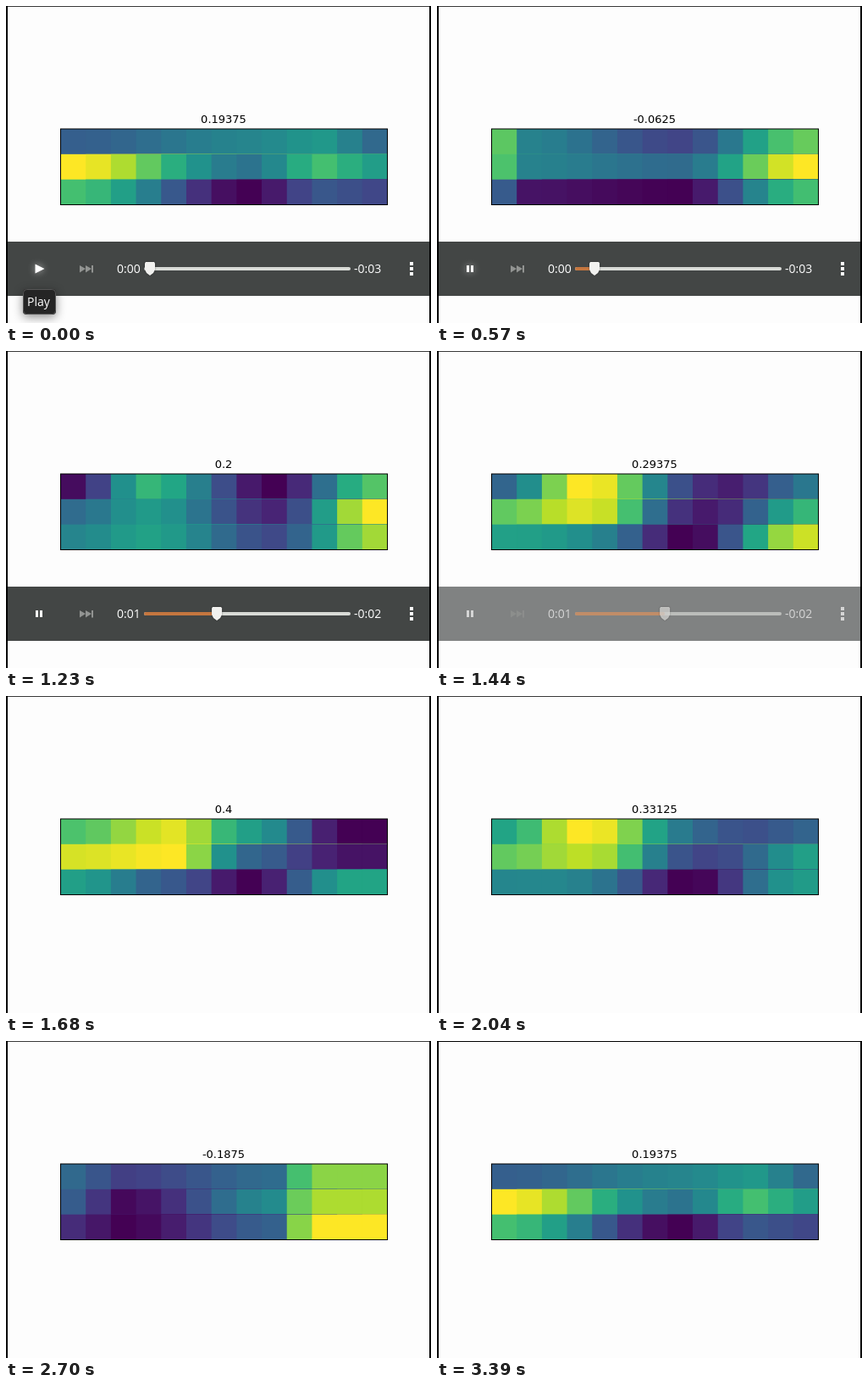
An HTML page with a canvas for the animation above (3480 ms loop, 502x374 px).

```html
<!DOCTYPE html>
<html lang="en">
<head>
<meta charset="utf-8">
<title>Heatmap video</title>
<style>
html, body { margin: 0; width: 100%; height: 100%; overflow: hidden; background: #fdfdfd; }
canvas { display: block; }
</style>
</head>
<body>
<canvas id="stage" width="502" height="374"></canvas>
<script>
const ctx = document.getElementById('stage').getContext('2d');
const LOOP = 3480, STEP = 30;
const COLS = 13, ROWS = 3;
const MAP = { x: 64.5, y: 145, w: 386, h: 89.5 };
const UI_FONT = '14px "Open Sans", "Noto Sans", sans-serif';
const VIRIDIS = ['#440154', '#482475', '#414487', '#355f8d', '#2a788e', '#21918c',
  '#22a884', '#44bf70', '#7ad151', '#bddf26', '#fde725']
  .map(hex => [1, 3, 5].map(i => parseInt(hex.slice(i, i + 2), 16)));

// Each row of a pose eases through four heats (percent), placed at the columns `at`.
const poses = [
  { time: 240, title: 0.19375, at: [0, 7, 10, 12], rows: [[30, 45, 53, 34], [100, 38, 70, 55], [70, 0, 27, 21]] },
  { time: 570, title: -0.0625, at: [0, 1, 7, 12], rows: [[73, 43, 20, 75], [70, 43, 34, 98], [28, 5, 0, 68]] },
  { time: 1230, title: 0.2, at: [0, 3, 8, 12], rows: [[3, 66, 0, 73], [35, 54, 10, 100], [45, 57, 22, 86]] },
  { time: 1680, title: 0.4, at: [0, 4, 7, 11], rows: [[70, 94, 55, 0], [92, 98, 32, 5], [55, 27, 0, 57]] },
  { time: 2370, title: 0.26875, at: [0, 3, 8, 12], rows: [[45, 100, 20, 62], [55, 76, 16, 100], [36, 54, 0, 50]] },
  { time: 2700, title: -0.1875, at: [0, 2, 8, 9.5], rows: [[33, 18, 34, 80], [28, 2, 46, 85], [12, 0, 30, 97]] }
];
poses.push({ ...poses[0], time: 2940 });
const times = poses.map(p => p.time);

const mix = (a, b, k) => a + (b - a) * k;
const clamp = (v, lo = 0, hi = 1) => Math.min(hi, Math.max(lo, v));
const linear = k => k;
const smooth = k => k * k * (3 - 2 * k);

function sample(xs, ys, x, ease = linear) {
  let i = 0;
  while (i < xs.length - 2 && x >= xs[i + 1]) i++;
  return mix(ys[i], ys[i + 1], ease(clamp((x - xs[i]) / (xs[i + 1] - xs[i]))));
}

function viridis(v) {
  const p = clamp(v) * 10, i = Math.min(9, Math.floor(p));
  return `rgb(${VIRIDIS[i].map((c, n) => Math.round(mix(c, VIRIDIS[i + 1][n], p - i)))})`;
}

function rect(color, x, y, w, h) {
  ctx.fillStyle = color;
  ctx.fillRect(x, y, w, h);
}

function shape(color, ...points) {
  ctx.fillStyle = color;
  ctx.beginPath();
  points.forEach(([x, y]) => ctx.lineTo(x, y));
  ctx.fill();
}

function pill(color, x, y, w, h, r) {
  ctx.fillStyle = color;
  ctx.beginPath();
  ctx.roundRect(x, y, w, h, r);
  ctx.fill();
}

function text(str, x, y, color, font, align = 'left') {
  ctx.fillStyle = color;
  ctx.font = font;
  ctx.textAlign = align;
  ctx.fillText(str, x, y);
}

function drawHeatmap(t) {
  const cells = [];
  for (let r = 0; r < ROWS; r++)
    for (let c = 0; c < COLS; c++)
      cells.push(sample(times, poses.map(p => sample(p.at, p.rows[r], c, smooth)), t));
  const lo = Math.min(...cells), hi = Math.max(...cells);
  // Every cell reaches the lower right corner, so later ones cover it without seams.
  cells.forEach((v, i) => {
    const dx = MAP.w * (i % COLS) / COLS, dy = MAP.h * Math.floor(i / COLS) / ROWS;
    rect(viridis((v - lo) / (hi - lo)), MAP.x + dx, MAP.y + dy, MAP.w - dx, MAP.h - dy);
  });
  ctx.strokeStyle = '#000';
  ctx.lineWidth = 1;
  ctx.strokeRect(MAP.x, MAP.y, MAP.w, MAP.h);
  const title = Math.round(sample(times, poses.map(p => p.title), t) * 160) / 160;
  text(String(title), 257, 138, '#000', '13px "DejaVu Sans", sans-serif', 'center');
}

function drawControls(t) {
  rect('#434645', 2, 278, 498, 64);

  ctx.save();
  if (t < 900) {
    ctx.shadowColor = 'rgba(255,255,255,.6)';
    ctx.shadowBlur = 9;
  }
  if (t < 240) {
    shape('#fff', [34.5, 304.5], [45.5, 310], [34.5, 315.5]);
  } else {
    for (const x of [35, 40]) rect('#fff', x, 306, 3, 8);
  }
  ctx.restore();

  const dim = '#929492';
  for (const x of [87, 94]) shape(dim, [x, 306], [x + 7, 310], [x, 314.5]);
  rect(dim, 101, 306, 2, 8.5);

  const late = t >= 1200;
  text(late ? '0:01' : '0:00', 131, 315, '#fff', UI_FONT);
  text(late ? '-0:02' : '-0:03', 411, 315, '#fff', UI_FONT);

  const x = 170 + Math.max(0, t - 402) * 0.0955;
  pill('#d9dbd7', 163, 308, 244, 4, 2);
  if (t >= 240) pill('#c5763f', 163, 308, x - 163, 4, 2);
  ctx.save();
  ctx.shadowColor = 'rgba(0,0,0,.5)';
  ctx.shadowBlur = 2;
  shape('#f1f1ef', [x - 5, 302], [x + 5, 302], [x + 6, 303.5], [x + 6, 311],
    [x + 4, 315], [x, 318], [x - 4, 315], [x - 6, 311], [x - 6, 303.5]);
  ctx.restore();

  for (const y of [302, 308, 314]) rect('#fff', 477, y, 4, 4);
}

function drawTooltip() {
  ctx.save();
  ctx.shadowColor = 'rgba(0,0,0,.45)';
  ctx.shadowBlur = 12;
  ctx.shadowOffsetY = 3;
  pill('#252525', 20, 334, 39, 30, 4);
  ctx.restore();
  ctx.strokeStyle = '#555';
  ctx.lineWidth = 1;
  ctx.beginPath();
  ctx.roundRect(20.5, 334.5, 38, 29, 4);
  ctx.stroke();
  text('Play', 25, 354, '#fff', UI_FONT);
}

function draw(now) {
  const t = Math.floor((now % LOOP) / STEP) * STEP;
  rect('#fdfdfd', 0, 0, 502, 374);
  drawHeatmap(t);
  ctx.globalAlpha = clamp((1560 - t) / 180);
  if (ctx.globalAlpha > 0) drawControls(t);
  ctx.globalAlpha = clamp((360 - t) / 120);
  if (ctx.globalAlpha > 0) drawTooltip();
  ctx.globalAlpha = 1;
  rect(t < 3390 ? '#3a3a3a' : '#000', 0, 0, 502, 1);
  rect('#000', 0, 0, 2, 374);
  rect('#000', 500, 0, 2, 374);
}

function tick() {
  draw(performance.now());
  requestAnimationFrame(tick);
}
tick();
</script>
</body>
</html>
```
